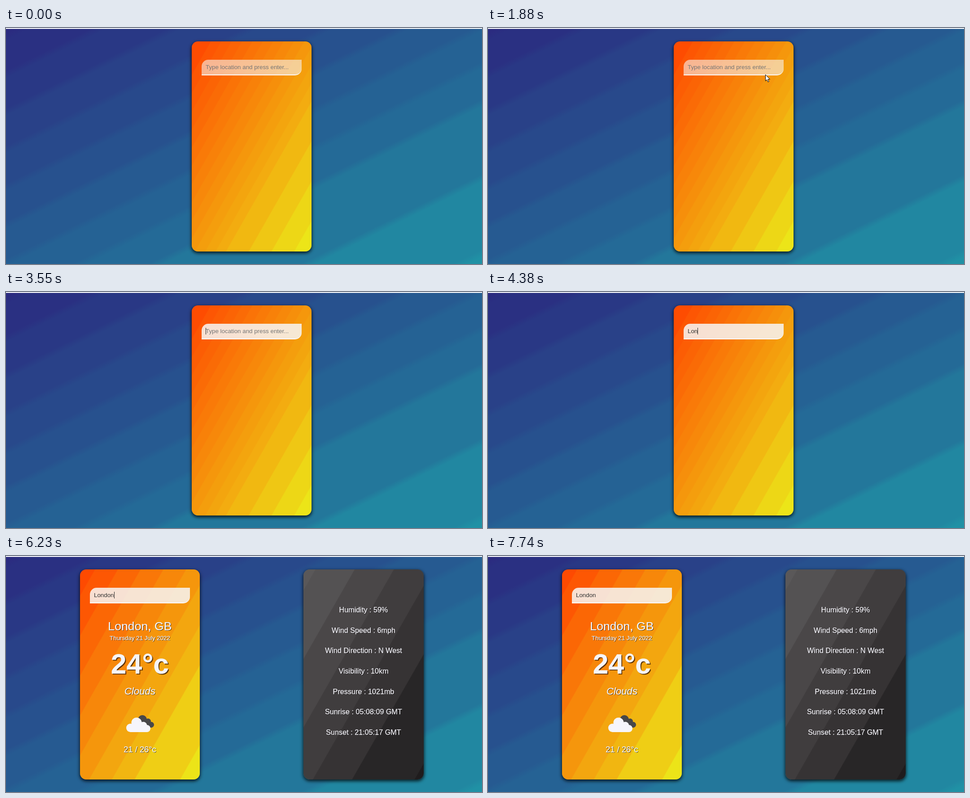
Recreate the animation shown at these times as an HTML page. Size 1061 by 528 pixels, loop 8 s.

```html
<!DOCTYPE html>
<html lang="en">
<head>
<meta charset="utf-8">
<title>Weather</title>
<style>
  html, body { margin: 0; width: 100%; height: 100%; overflow: hidden; background: #fff; }
  body { position: relative; font-family: "Liberation Sans", Arial, sans-serif; }
  #sky { position: absolute; left: 0; top: 2px; width: 1061px; height: 526px; }
  .card {
    position: absolute; top: 30px; width: 267px; height: 469.5px;
    border-radius: 14px; box-shadow: 0 3px 7px 1px rgba(0, 0, 0, .75);
  }
  #side { left: 663px; width: 268px; }
  #field {
    position: absolute; left: 22px; top: 41px; width: 223px; height: 35px;
    box-sizing: border-box; border-radius: 15px 0; border-bottom: 2px solid #fbf9fb;
  }
  #entry {
    position: absolute; left: 31px; top: 50px; font-size: 13.333px;
    line-height: 15px; white-space: pre;
  }
  #caret { position: absolute; top: 50px; width: 1px; height: 15px; background: #222; }
  .row {
    position: absolute; left: 0; width: 100%; text-align: center; line-height: 0;
    white-space: pre; color: #f6f5fb; -webkit-text-stroke: .25px;
    text-shadow: 1px 1px 0 rgba(0, 0, 0, .65);
  }
  .temp { font-weight: bold; text-shadow: 2px 2px 0 rgba(50, 25, 0, .8); }
  .sort { font-style: italic; }
  svg { position: absolute; left: 0; top: 0; overflow: visible; }
  #cloud { left: 103px; top: 326px; }
</style>
</head>
<body>
<div id="sky"></div>
<div class="card" id="main">
  <div id="field"></div>
  <div id="entry"></div>
  <div id="caret"></div>
  <div id="report">
    <svg id="cloud" width="62" height="39">
      <g fill="#484749">
        <circle cx="36" cy="10" r="10"/>
        <circle cx="48.5" cy="14" r="6.5"/>
        <circle cx="55.5" cy="21.5" r="6.5"/>
        <path d="M32 12H50L56 28H36z"/>
      </g>
      <g fill="#f6f5fb">
        <circle cx="23" cy="17" r="11.5"/>
        <circle cx="38" cy="23.5" r="8.5"/>
        <circle cx="9.5" cy="28.5" r="9.5"/>
        <circle cx="46" cy="30" r="8"/>
        <path d="M9 20H40L46 38H9z"/>
      </g>
    </svg>
  </div>
</div>
<div class="card" id="side"></div>
<svg id="arrow" width="12" height="18">
  <path d="M.5 .5V14.5L3.7 11.5 6 16.8 8.2 15.8 6 10.7H10.4z" fill="#fff" stroke="#000"/>
</svg>
<svg id="beam" width="7" height="17">
  <path d="M.5 .5H2.5L3.5 1.5 4.5 .5H6.5M3.5 1.5V15M.5 16H2.5L3.5 15 4.5 16H6.5" fill="none" stroke="#111"/>
</svg>
<script>
const LOOP = 8000, MOVE = 1100, ENTER = 2000, FOCUS = 2480, LEAVE = 2720, FOUND = 6230;
const BLINK = 530;
const KEYS = [3700, 3980, 4380, 4630, 4780, 5060];
const CITY = 'London';
const $ = id => document.getElementById(id);

// Stepped corner-to-corner gradient: even bands, then wider ones towards the end.
function bands(from, to, first, step, wide, soft = .002) {
  const stops = [];
  for (let a = 0, b = first; a < 1; a = b, b = Math.min(1, b + (b < .64 ? step : wide))) {
    const rgb = from.map((c, k) => Math.round(c + (to[k] - c) * (a + b) / 2));
    stops.push(`rgb(${rgb}) ${(a + soft) * 100}% ${(b - soft) * 100}%`);
  }
  return `linear-gradient(to bottom right, ${stops})`;
}

const RED = [255, 69, 0], YELLOW = [235, 235, 25];
const fine = bands(RED, YELLOW, .08, .0433, .095);
const coarse = bands(RED, YELLOW, .063, .095, .19);
$('sky').style.background = bands([43, 42, 128], [32, 146, 165], .017, .08, .16, .008);
$('side').style.background = bands([92, 90, 91], [30, 27, 28], .05, .163, .26);

function row(parent, text, size, baseline, kind = '') {
  const el = document.createElement('div');
  el.className = 'row ' + kind;
  el.textContent = text;
  el.style.fontSize = size + 'px';
  el.style.top = baseline - 30 - size * .3465 + 'px';
  parent.append(el);
}

row($('report'), 'London, GB', 26.67, 166);
row($('report'), 'Thursday 21 July 2022', 13.333, 189);
row($('report'), '24°c', 62.5, 262.5, 'temp');
row($('report'), 'Clouds', 22.22, 311, 'sort');
row($('report'), '21 / 26°c', 18.33, 439);
['Humidity : 59%', 'Wind Speed : 6mph', 'Wind Direction : N West', 'Visibility : 10km',
  'Pressure : 1021mb', 'Sunrise : 05:08:09 GMT', 'Sunset : 21:05:17 GMT']
  .forEach((text, i) => row($('side'), text, 16.2, 125.5 + 45.7 * i));

const show = (el, on) => { el.style.visibility = on ? 'visible' : 'hidden'; };
const move = (el, x, y) => { el.style.transform = `translate(${x}px, ${y}px)`; };

function pointer(t) {
  // One quick jump, then five decelerating steps up to the field.
  const k = Math.min(5, Math.max(0, Math.floor((t - 1280) / 120)));
  const rest = (1 - k / 5) ** 2;
  if (t < 1260) move($('arrow'), 751, 466);
  else move($('arrow'), Math.round(618 - 16 * rest), Math.round(104 + 104 * rest));
  show($('arrow'), t >= MOVE && t < ENTER);

  move($('beam'), t < 2600 ? 612 : 611, t < 2140 ? 84 : t < 2600 ? 78 : 68);
  show($('beam'), t >= ENTER && t < LEAVE);
}

function input(t) {
  const pressed = KEYS.filter(k => k <= t);
  const count = pressed.length;
  const active = count ? pressed[count - 1] : FOCUS;
  $('entry').textContent = CITY.slice(0, count) || 'Type location and press enter...';
  $('entry').style.color = count ? '#313131' : '#757575';
  $('caret').style.left = Math.round(31 + count * 7.45) + 'px';
  show($('caret'), t >= FOCUS && (t - active) % (2 * BLINK) < BLINK);

  const alpha = .59 + .13 * ((t >= ENTER) + (t >= 2140));
  $('field').style.backgroundColor = `rgba(247, 247, 247, ${alpha})`;
}

function render(t) {
  const found = t >= FOUND;
  $('main').style.left = (found ? 165 : 414) + 'px';
  $('main').style.background = found ? coarse : fine;
  show($('report'), found);
  show($('side'), found);
  pointer(t);
  input(t);
}

const start = performance.now();
function tick(now) {
  render(Math.max(0, now - start) % LOOP);
  requestAnimationFrame(tick);
}
render(0);
requestAnimationFrame(tick);
</script>
</body>
</html>
```
